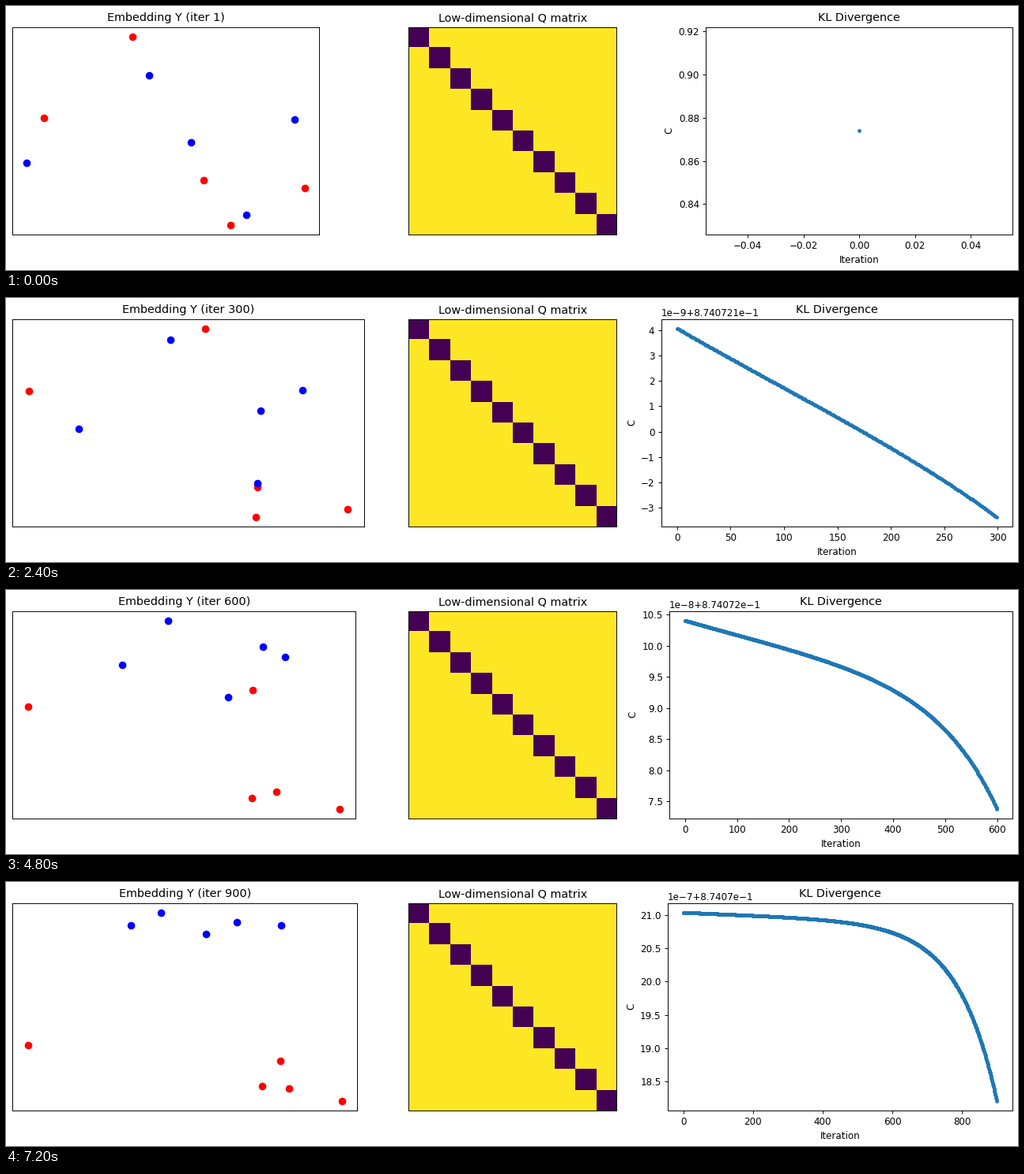
These frames come from a looping animation (1280x335 px, 8 s). A matplotlib script:

```python
import numpy as np
import matplotlib.pyplot as plt
from matplotlib.animation import FuncAnimation

W, H, DPI = 1280, 335, 85.9
LEFT, RIGHT, TOP, SIDE = 8.4, 1272.9, 26.6, 263
PAD = 1.08 * 10 / 72 * DPI
FRAMES, MIDDLE = 10, 4 / 9
EDGE = 1 / 22

# Panel fractions of each point: at the start, at MIDDLE and at the end.
RED = [
    [(.392, .954), (.608, .899), (.777, .240)],
    [(.103, .563), (.045, .662), (.045, .316)],
    [(.624, .262), (.726, .173), (.801, .105)],
    [(.954, .224), (.954, .046), (.954, .046)],
    [(.711, .046), (.694, .072), (.723, .118)],
]
BLUE = [
    [(.446, .766), (.457, .954), (.430, .954)],
    [(.045, .344), (.247, .563), (.343, .890)],
    [(.582, .443), (.746, .635), (.779, .890)],
    [(.920, .555), (.793, .719), (.650, .905)],
    [(.763, .095), (.675, .323), (.561, .848)],
]


def clock(s):
    """Eased time for x and y: sideways drift leads, separation eases in and out."""
    return np.array([s ** 1.2, s * s * (3 - 2 * s)])


def embedding(s, poses):
    """Parabola through the three poses, kept inside the panel margins."""
    start, mid, end = np.array(poses).transpose(1, 0, 2)
    c, m = clock(s), clock(MIDDLE)
    first, second = (mid - start) / m, (end - mid) / (1 - m)
    xy = start + c * first + c * (c - m) * (second - first)
    return np.clip(xy, EDGE, 1 - EDGE)


def divergence(n):
    """Slow linear descent that turns into exponential collapse."""
    c = 3.737 - 0.0196 * n + 0.41 * np.exp(-n / 100) - 265 * np.exp((n - 899) / 112)
    return 0.8740721 + 1e-9 * c


def rect(x, width):
    return [x / W, 1 - (TOP + SIDE) / H, width / W, SIDE / H]


def steps(k):
    return max(1, 100 * k)


def draw_embedding(k):
    ax_y.clear()
    for color, poses in (("red", RED), ("blue", BLUE)):
        ax_y.scatter(*embedding(k / (FRAMES - 1), poses).T, s=50, c=color)
    ax_y.set(title=f"Embedding Y (iter {steps(k)})", xticks=[], yticks=[])


def draw_divergence(k):
    ax_c.clear()
    n = np.arange(steps(k))
    ax_c.plot(n, divergence(n), ".-")
    ax_c.set(title="KL Divergence", xlabel="Iteration", ylabel="C")


def layout():
    """Outer panel widths; each one adapts to its tick labels and to the one before."""
    spans, span = [], 292
    for k in range(FRAMES):
        draw_divergence(k)
        room = ax_c.bbox.x0 - ax_c.yaxis.get_tightbbox().x0 + PAD
        span = (RIGHT - LEFT - SIDE + span - 2 * room) / 3
        spans.append(span)
    return spans


# The tiny surplus keeps the truncated pixel size exact.
fig = plt.figure(figsize=((W + 1e-6) / DPI, (H + 1e-6) / DPI), dpi=DPI, facecolor="white")
ax_y = fig.add_axes(rect(LEFT, 400))
ax_q = fig.add_axes(rect((LEFT + RIGHT - SIDE) / 2, SIDE))
ax_c = fig.add_axes(rect(RIGHT - 400, 400))

ax_q.imshow(1 - np.eye(10), cmap="viridis", aspect="auto", interpolation="nearest")
ax_q.set(title="Low-dimensional Q matrix", xticks=[], yticks=[])

SPANS = layout()


def update(k):
    ax_y.set_position(rect(LEFT, SPANS[k]))
    ax_c.set_position(rect(RIGHT - SPANS[k], SPANS[k]))
    draw_embedding(k)
    draw_divergence(k)
    return []


anim = FuncAnimation(fig, update, frames=FRAMES, interval=800,
                     repeat=True, repeat_delay=0, blit=False)
plt.show()
```
